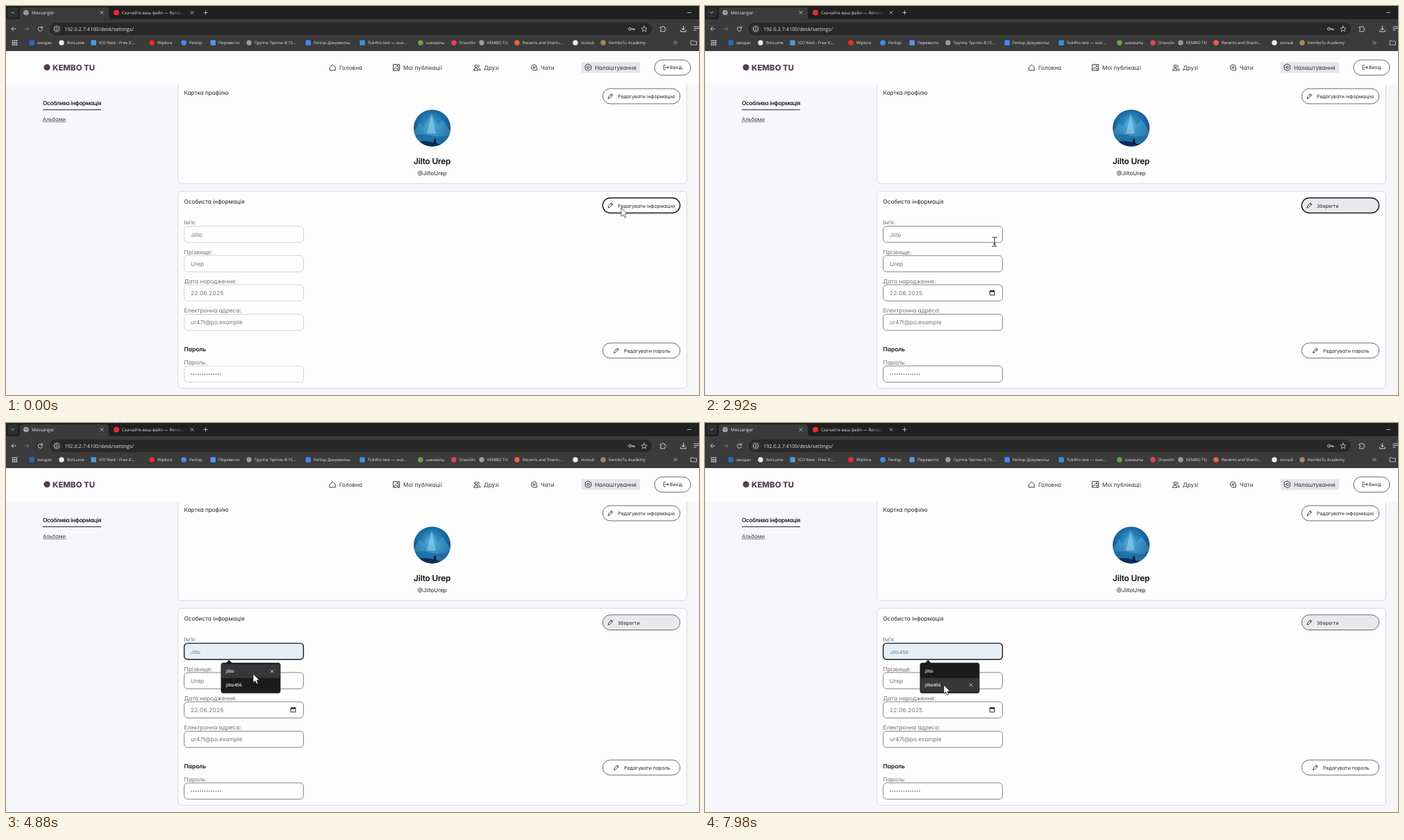
Recreate the animation shown at these times as an HTML page. Size 998 by 561 pixels, loop 8 s.

```html
<!DOCTYPE html>
<html lang="uk">
<head>
<meta charset="utf-8">
<title>Messanger</title>
<style>
html, body { margin: 0; width: 100%; height: 100%; overflow: hidden; background: #f7f6fb; }
svg { display: block; width: 100%; height: 100%; }
text { text-rendering: geometricPrecision; white-space: pre; }
.page { font-family: Inter, "Noto Sans", sans-serif; font-feature-settings: "cv11"; }
.ui { font-family: "Open Sans", "Noto Sans", sans-serif; }
.line { fill: none; stroke-linecap: round; stroke-linejoin: round; }
</style>
</head>
<body>
<svg id="stage" viewBox="0 0 998 561" xmlns="http://www.w3.org/2000/svg"></svg>
<script>
const LOOP = 8000;
const EDIT = 2000, FOCUS = 3520, MENU = 3620;
const INK = '#242226', PLUM = '#543c52';
const FIRST = 'Jilto', LAST = 'Urep', OPTIONS = [FIRST, FIRST + '456'];

// y is the vertical middle of the text
const text = (x, y, size, str, fill = INK, extra = '', font = 'page') =>
  `<text class="${font}" x="${x}" y="${y + size * .36}" font-size="${size}" fill="${fill}" ${extra}>${str}</text>`;
const ui = (x, y, size, str, fill = '#e3e3e3', extra = '') => text(x, y, size, str, fill, extra, 'ui');
const rect = (x, y, w, h, r, fill, extra = '') =>
  `<rect x="${x}" y="${y}" width="${w}" height="${h}" rx="${r}" fill="${fill}" ${extra}/>`;
const dot = (x, y, r, fill, extra = '') => `<circle cx="${x}" cy="${y}" r="${r}" fill="${fill}" ${extra}/>`;
const line = (x, y, d, color = INK, width = .8) =>
  `<path class="line" transform="translate(${x} ${y})" d="${d}" stroke="${color}" stroke-width="${width}"/>`;

const CROSS = 'M-2-2L2 2M2-2L-2 2';
const PENCIL = 'M-3.3 3.3L-2.6 .8L1.5-3.3L3.3-1.5L-.8 2.6ZM.5-2.3L2.3-.5';
const RING = 'M-3.6 0A3.6 3.6 0 1 0 3.6 0A3.6 3.6 0 1 0-3.6 0';

function browser() {
  const light = '#d5d5d5';
  const marks = [
    [45, 'эмодзи', '#2f66bd', 1], [88, 'BotLume', '#e8e8e8'], [134, 'ICO Nest - Free IC...', '#4d9ad8', 1],
    [218, 'Wiplora', '#f02b2b'], [264, 'Fenlop', '#4b8bf0'], [306, 'Перевести', '#5b91ee', 1],
    [358, 'Группа Тритон 8:15...', '#9b9b9b'], [443, 'Fenlop Документы', '#4386f5', 1],
    [521, 'Tuk4Vo.test — онл...', '#3f8fd4', 1], [605, 'шахматы', '#64a744'],
    [653, 'Dravolin', '#ee3d55'], [693, 'KEMBO TU', '#9b9b9b'],
    [744, 'Recents and Sharin...', '#ee6148'], [828, 'stonub', '#ededed'], [868, 'KemboTu Academy', '#a98a55']
  ];
  let s = rect(0, 0, 998, 65, 0, '#3b3b3b') + rect(0, 0, 998, 19, 0, '#1f2020')
    + rect(2, 2, 15, 15, 4, '#2e2f2f') + line(9.5, 9.5, 'M-2-1L0 1L2-1', light)
    + `<path d="M16 19.5Q20 19 20 15V6Q20 2 24 2H144Q148 2 148 6V15Q148 19 152 19.5Z" fill="#3b3b3b"/>`
    + dot(29, 9.5, 3.8, '#a9adb1') + line(29, 9.5, 'M-3-1L0-1L1 1L-1 3M1-3L2-1L3 0', '#55585b')
    + ui(37, 9.5, 6.4, 'Messanger') + line(138, 9.5, CROSS, light)
    + dot(159, 9.5, 4, '#e52b32')
    + ui(167, 9.5, 6.2, 'Скачайте ваш файл — Rendup', '#dadada', 'clip-path="url(#tab)"')
    + rect(238, 3, 22, 13, 0, 'url(#fade)')
    + line(268, 9.5, CROSS, light) + line(287.5, 9.5, 'M-2.6 0H2.6M0-2.6V2.6', light)
    + line(984, 9.5, 'M-2.5 0H2.5', light);
  s += line(11, 33, 'M3 0H-3M-.3-2.7L-3 0L-.3 2.7', light, .9)
    + line(30, 33, 'M-3 0H3M.3-2.7L3 0L.3 2.7', '#777', .9)
    + line(49.5, 33, 'M2.6-1.6A3.1 3.1 0 1 0 3 1M2.9-3.4V-1.2H.7', light, .9)
    + rect(63, 24, 867, 18, 9, '#282828') + dot(73, 33, 6.6, '#3b3b3b')
    + line(73, 33, RING + 'M0-.3V1.8M0-1.8V-1.7', light, .8)
    + ui(84, 33, 7.3, '192.0.2.7:4100/desk/settings/')
    + line(901, 33, 'M-.6 0A1.9 1.9 0 1 0-4.4 0A1.9 1.9 0 1 0-.6 0H4V1.8M2 0V1.5', light, 1)
    + line(919, 33, 'M0-4L1.2-1.2L4-1L1.9 1L2.5 3.8L0 2.3L-2.5 3.8L-1.9 1L-4-1L-1.2-1.2Z', light)
    + line(946, 33, 'M-3.4-2.6H-1.3A1.2 1.2 0 0 1 1.1-2.6H2.8V-.8A1.2 1.2 0 0 1 2.8 1.6V3.8H-3.4V1.6A1.2 1.2 0 0 0-3.4-.8Z', light, .9)
    + line(975.5, 33, 'M0-4V1.4M-2.3-.8L0 1.5L2.3-.8M-3.8 2V3.9H3.8V2', light, 1)
    + line(993, 32.5, 'M-2-2.5H5M-2 0H5M-2 2.5H1', light, .9);
  for (let i = 0; i < 9; i++) s += rect(8.8 + i % 3 * 2.8, 49.2 + Math.floor(i / 3) * 2.8, 1.9, 1.9, .3, light);
  for (const [x, str, color, square] of marks) {
    s += square ? rect(x - 11.5, 49.3, 7.4, 7.4, .8, color) : dot(x - 8, 53, 3.7, color);
    s += ui(x, 53, 5.9, str);
  }
  return s + line(964, 53, 'M-2.3-2L-.3 0L-2.3 2M.6-2L2.6 0L.6 2', light)
    + line(990.5, 53, 'M-4-3H-1L0-2H4V3H-4Z', light);
}

function header() {
  const nav = [
    [480, 'Головна', 'M-3.8-.4L0-4L3.8-.4V4.2H-3.8Z'],
    [572, 'Мої публікації', 'M-4.3-4.3H4.3V4.3H-4.3ZM-4.2 3L-1 0L3 4.2M1 2L2.5 .6L4.2 2M.6-1.8A.9 .9 0 1 0 2.4-1.8A.9 .9 0 1 0 .6-1.8'],
    [688, 'Друзі', 'M-3.4-1.8A1.9 1.9 0 1 0 .4-1.8A1.9 1.9 0 1 0-3.4-1.8M-4.8 4Q-4.6 1-1.5 1Q1.6 1 1.8 4ZM1.6-3.6A1.9 1.9 0 0 1 1.6 0M2.6 1.2Q4.6 1.8 4.8 4H3.4'],
    [770, 'Чати', 'M-4 0A4 4 0 0 1 4 0V4H0A4 4 0 0 1-4 0M-1.6-.8H1.8M-1.6 1H1.8'],
    [848, 'Налаштування', 'M0-4.8L4.2-2.4V2.4L0 4.8L-4.2 2.4V-2.4ZM-1.7 0A1.7 1.7 0 1 0 1.7 0A1.7 1.7 0 1 0-1.7 0']
  ];
  let s = rect(0, 65, 998, 48.5, 0, '#fdfdfe') + dot(59, 88.5, 4.6, PLUM)
    + text(67, 88.5, 11.4, 'KEMBO TU', PLUM, 'font-weight="800"')
    + rect(828.5, 80.8, 84.5, 15.6, 2, '#e8e4ee');
  for (const [x, str, icon] of nav) s += line(x - 9.6, 88.6, icon, INK, .9) + text(x, 88.7, 8.2, str, '#343136');
  return s + rect(934, 77.8, 52, 22, 11, '#fff', `stroke="${PLUM}" stroke-width=".8"`)
    + line(950.5, 88.6, 'M-1-3.3H-3.3V3.3H-1M-1.4 0H3.8M2-1.8L3.8 0L2 1.8', INK, .8)
    + text(956, 88.7, 6.8, 'Вихід');
}

const pill = (y, label, iconX = 870.5, textX = 881, id = '') =>
  rect(859.3, y, 111.4, 21.8, 10.9, '#fff', `id="${id}" stroke="#4a434c" stroke-width=".8"`)
  + line(iconX, y + 10.7, PENCIL, INK, .9)
  + text(textX, y + 11.3, 7, label, INK, id && `id="${id}Label"`);

const field = (y, label, value, extra = '') =>
  text(256.5, y - 5.2, 8.25, label, '#757278')
  + rect(256.6, y, 171.8, 23.4, 5, '#fff', 'class="box"')
  + text(266, y + 12, 8.3, value, '#777', `class="value" ${extra}`);

function avatar() {
  return `<g clip-path="url(#face)">` + rect(586, 148, 56, 56, 0, 'url(#sky)')
    + '<path d="M586 184L596 168L602 174L613 154L621 172L629 164L642 184V206H586Z" fill="#5cb6e0" opacity=".36"/>'
    + '<path d="M606 184L613 156L619 184Z" fill="#a9e2f5" opacity=".45"/>'
    + '<path d="M586 187Q600 183 613 187T642 185V204H586Z" fill="#1a689f" opacity=".7"/>'
    + '<path d="M586 197Q604 192 620 198T642 195V206H586Z" fill="#0b2e56"/>'
    + '<path d="M615.5 199L616.5 192L618.5 191L620 199Z" fill="#0a1f3c"/></g>';
}

function page() {
  const card = (y, h) => rect(247.8, y, 732.6, h, 5, '#fdfdfd', 'stroke="#d6d2dc" stroke-width=".9"');
  return rect(0, 65, 998, 496, 0, '#f7f6fb')
    + text(53, 140.4, 8.3, 'Особлива інформація', INK, 'font-weight="600" letter-spacing="-.36"')
    + rect(53, 149, 84, 1.2, 0, PLUM)
    + text(53, 163, 7.5, 'Альбоми', '#3b383d') + rect(53, 166.8, 33.4, .6, 0, '#3b383d')
    + card(100, 156) + card(267.3, 284)
    + text(256.5, 124.6, 8.15, 'Картка профілю') + pill(119.2, 'Редагувати інформацію')
    + avatar()
    + text(613.7, 223.5, 12, FIRST + ' ' + LAST, '#111', 'font-weight="600" text-anchor="middle" letter-spacing="-.25"')
    + text(613.7, 241.6, 8, '@' + FIRST + LAST, INK, 'text-anchor="middle"')
    + text(256.5, 282, 8.25, 'Особиста інформація') + pill(276.7, '', 870.5, 881, 'save')
    + field(317.6, 'Ім’я:', FIRST, 'id="name"')
    + field(359.9, 'Прізвище:', LAST)
    + field(402, 'Дата народження:', '22.06.2025', 'letter-spacing=".24"')
    + `<g id="calendar">${line(413.7, 413.7, 'M-3.2-2.8H3.2V3.2H-3.2ZM-1.8-3.8V-2.8M1.8-3.8V-2.8', '#111', .9)}${rect(410.5, 410.6, 6.4, 1.8, 0, '#111')}</g>`
    + field(444.5, 'Електронна адреса:', 'ur47t@po.example')
    + text(256.5, 494.7, 8.4, 'Пароль', '#111', 'font-weight="600"')
    + pill(486, 'Редагувати пароль', 879, 890)
    + field(519, 'Пароль:', '')
    + '<path class="line" d="M267 530.9H309.5" stroke="#777" stroke-width="1.7" stroke-dasharray="0 3.23"/>'
    + '<path id="caret" d="M283.6 324.7V334" stroke="#111" stroke-width=".7"/>';
}

const menu = () => '<g id="menu"><path d="M316.5 346.5L321.2 341.8L326 346.5Z" fill="#1b1b1c"/>'
  + rect(309.8, 346, 85.3, 43.6, 3, '#1b1b1c', 'stroke="#2d2d2e" stroke-width=".6"')
  + `<g id="pick">${rect(310.4, 348, 84.1, 19.8, 0, '#37373a')}${line(383, 358, CROSS, '#e8e8e8')}</g>`
  + OPTIONS.map((o, i) => ui(317, 358.1 + i * 19.8, 6.3, o, '#f3f3f3', 'font-weight="600"')).join('') + '</g>';

const cursors = () =>
  '<path id="arrow" d="M0 0V12.4L2.9 9.8L4.9 14.2L6.9 13.3L5 9L8.8 8.7Z" fill="#fff" stroke="#222" stroke-width=".7"/>'
  + '<path id="beam" class="line" d="M-3-6.5Q-.5-6.5 0-5.6Q.5-6.5 3-6.5M0-5.6V5.6M-3 6.5Q-.5 6.5 0 5.6Q.5 6.5 3 6.5M-1.3 3H1.3" stroke="#222" stroke-width="1"/>';

const defs = `<defs>
  <clipPath id="tab"><rect x="160" y="0" width="97.5" height="19"/></clipPath>
  <clipPath id="face"><circle cx="613.7" cy="176" r="26.6"/></clipPath>
  <linearGradient id="fade"><stop stop-color="#1f2020" stop-opacity="0"/><stop offset=".9" stop-color="#1f2020"/></linearGradient>
  <radialGradient id="sky" cx=".48" cy=".42" r=".62"><stop stop-color="#4aa5d3"/><stop offset=".5" stop-color="#1f73ac"/><stop offset="1" stop-color="#0e3f70"/></radialGradient>
</defs>`;

document.getElementById('stage').innerHTML = defs + page() + header() + browser() + menu() + cursors();

const $ = id => document.getElementById(id);
const boxes = [...document.querySelectorAll('.box')];
const values = [...document.querySelectorAll('.value')];
const set = (el, attrs) => { for (const k in attrs) el.setAttribute(k, attrs[k]); };
const show = (el, on) => set(el, { visibility: on ? 'visible' : 'hidden' });

// time, x, y of the pointer
const PATH = [
  [0, 886, 291], [2080, 886, 291], [2450, 822, 302], [2900, 417, 340], [3000, 417, 340],
  [3400, 380, 336], [4300, 380, 336], [4750, 356, 362], [5900, 356, 362],
  [6550, 348, 364], [7050, 348, 364], [7500, 344, 378], [LOOP, 344, 378]
];

function pointer(t) {
  const i = PATH.findIndex(p => p[0] > t);
  const [t0, x0, y0] = PATH[i - 1], [t1, x1, y1] = PATH[i];
  const u = (t - t0) / (t1 - t0), e = u * u * (3 - 2 * u);
  return [x0 + (x1 - x0) * e, y0 + (y1 - y0) * e];
}

function draw(t) {
  const editing = t >= EDIT, focused = t >= FOCUS, open = t >= MENU;
  const [x, y] = pointer(t);
  const row = open && y > 347 ? (y > 368 ? 1 : 0) : -1;
  const preview = row >= 0;
  const overField = x > 256 && x < 428 && y > 317 && y < 342;

  set($('save'), {
    fill: editing ? '#e9e8ec' : '#fff',
    stroke: focused ? '#5d5960' : '#1c1a1e',
    'stroke-width': focused ? .9 : 1.4
  });
  $('saveLabel').textContent = editing ? 'Зберегти' : 'Редагувати інформацію';
  boxes.forEach((box, i) => {
    const active = focused && i === 0;
    set(box, {
      stroke: active ? '#1c1c1c' : editing ? '#77747a' : '#cfccd2',
      'stroke-width': active ? 1.4 : .9,
      fill: active && preview ? '#e5eff6' : '#fefefe'
    });
  });
  values.forEach(v => set(v, { fill: editing ? INK : '#7b787e' }));
  $('name').textContent = preview ? OPTIONS[row] : FIRST;
  set($('name'), { 'font-size': preview ? 7 : 8.3 });
  show($('calendar'), editing);
  show($('caret'), focused && !preview);
  show($('menu'), open);
  set($('pick'), { display: preview ? 'inline' : 'none', transform: `translate(0 ${row * 19.8})` });

  const at = { transform: `translate(${x} ${y})` };
  set($('arrow'), at);
  set($('beam'), at);
  show($('arrow'), !overField);
  show($('beam'), overField);
}

function tick() {
  draw(performance.now() % LOOP);
  requestAnimationFrame(tick);
}
tick();
</script>
</body>
</html>
```
